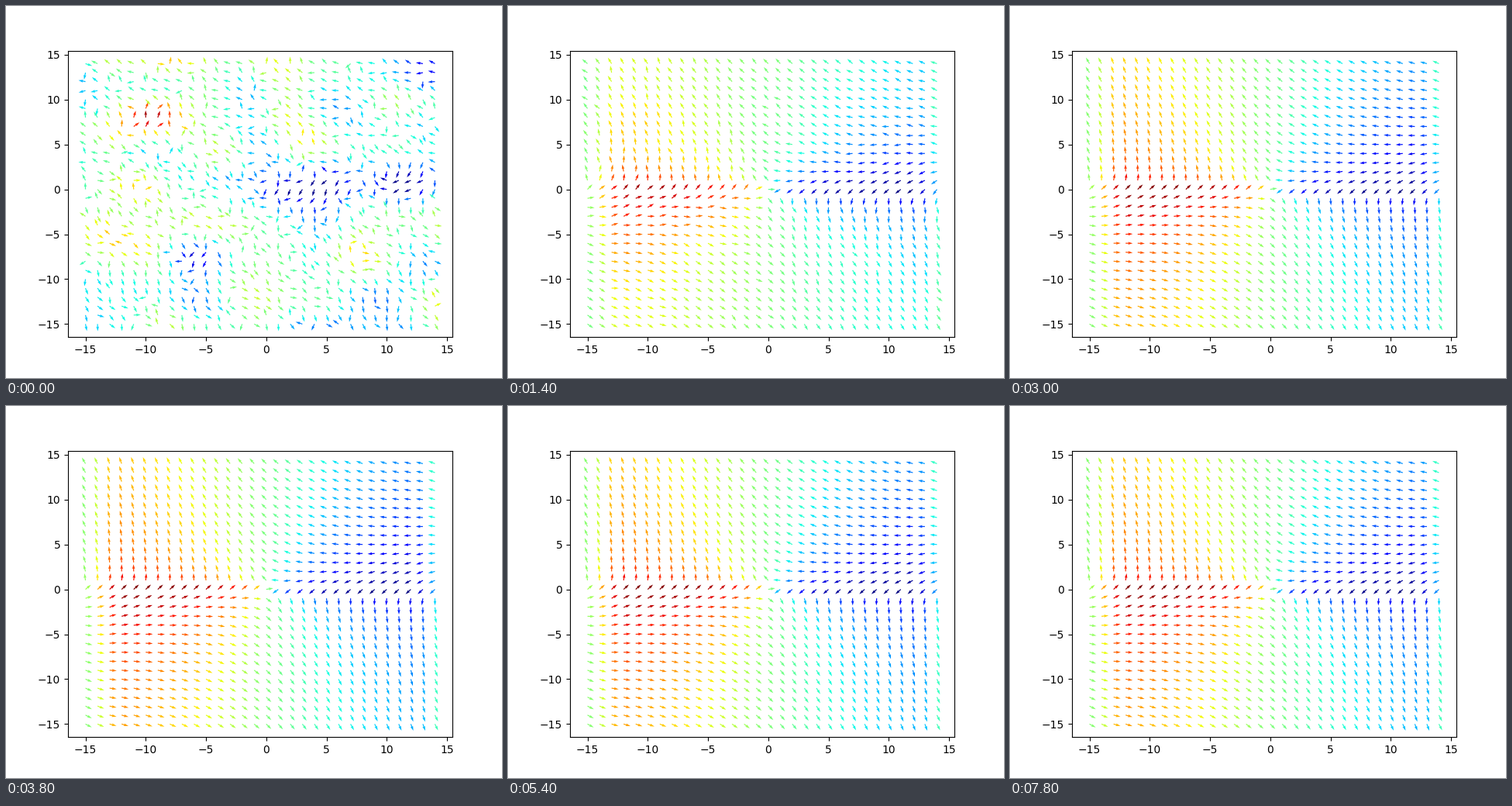
A matplotlib script for the animation above (8000 ms loop, 640x480 px).

```python
import numpy as np
import matplotlib.pyplot as plt
from matplotlib.animation import FuncAnimation

FRAMES, STEP = 40, 200
rng = np.random.default_rng(7)
axis = np.arange(-15.0, 15.0)
X, Y = np.meshgrid(axis, axis)


def wrap(angle):
    return (angle + np.pi) % (2 * np.pi) - np.pi


def smooth_noise(width):
    """Random field with unit spread, blurred over a few cells."""
    blur = np.exp(-((axis[:, None] - axis) / width) ** 2 / 2)
    blur /= np.sqrt((blur ** 2).sum(axis=1, keepdims=True))
    return blur @ rng.normal(size=X.shape) @ blur.T


def settled(swing):
    """Angle and colour of the ordered field, point-symmetric about 0."""
    right = X > 0
    s = np.abs(X)
    h = np.where(right, -Y, Y)
    r = np.abs(h)
    rise = np.where(h > 0, .84 * r ** .43, -.05 - .27 * r ** .76)
    power = .5 + .4 * r / (r + 4)
    ratio = (10 / np.maximum(s, .05)) ** power + .4 * np.maximum(s - 13, 0)
    phi = np.arctan(rise * ratio * np.maximum(r, 1) ** swing)
    size = (1 - np.exp(-s / 2)) * np.minimum(1, .1 + .38 * (15 - s))
    angle = np.pi / 4 + phi + np.pi * right
    return angle, np.where(right, -1, 1) * np.cos(phi) * size


def unsettled():
    """Patchy colours; each arrow leans to either side of the diagonal."""
    tone = .5 * settled(0)[1] + .3 * smooth_noise(1.6)
    tone = np.clip(tone, -.98, .98)
    flip = rng.random(X.shape) < .06 + .4 * np.exp(-(Y / 6) ** 2)
    side = np.where((Y >= 0) ^ flip, 1, -1)
    return np.pi / 4 + side * np.arccos(tone), tone


start_angle, start_tone = unsettled()
noise_a, noise_b = rng.normal(size=(2,) + X.shape)


def field(k):
    # Spread of the arrows away from the centre line rings down
    swing = .2 * np.cos(np.pi * (k - 7) / 4) * np.exp(-(k - 7) / 4.4)
    angle, tone = settled(swing)
    mix = np.exp(-k / 3)
    noise = noise_a * np.cos(.6 * k) + noise_b * np.sin(.6 * k)
    noise *= np.exp(-k / 3.8)
    angle = angle + wrap(start_angle - angle) * mix + .45 * noise
    tone = tone + (start_tone - tone) * mix + .06 * noise * (1 - mix)
    return np.cos(angle), np.sin(angle), tone


fig, ax = plt.subplots(figsize=(6.4, 4.8), dpi=100)
arrows = ax.quiver(X, Y, *field(0), cmap="jet", scale=54, clim=(-1, 1))
ax.set_xlim(-16.45, 15.45)
ax.set_ylim(-16.45, 15.45)


def update(k):
    arrows.set_UVC(*field(k))
    return arrows,


anim = FuncAnimation(fig, update, frames=FRAMES, interval=STEP,
                     repeat=True, repeat_delay=0)
plt.show()
```
